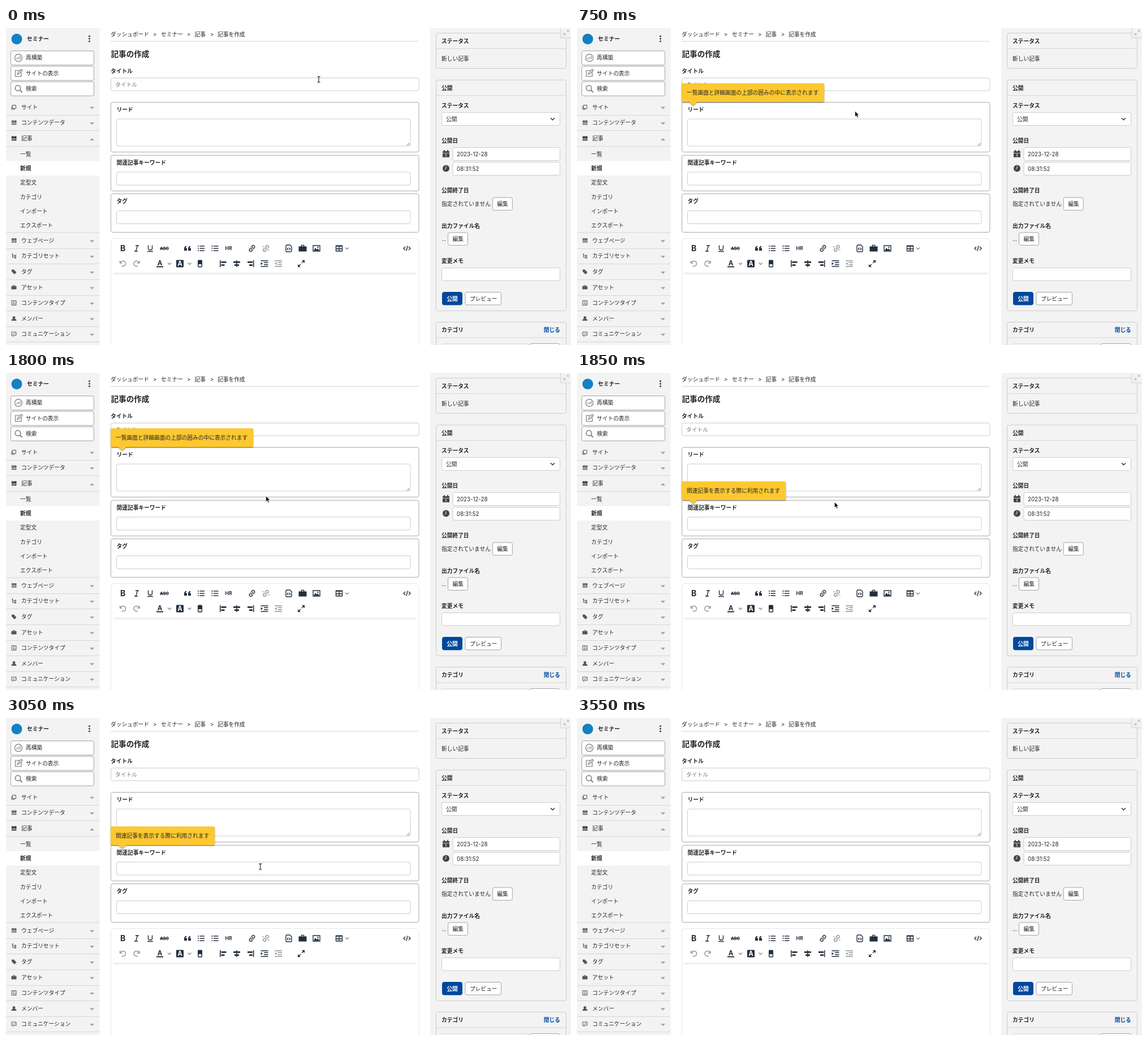
Animation of 999 by 561 pixels, one loop 3.95 s. Source, as an HTML page:

```html
<!DOCTYPE html>
<html lang="ja">
<head>
<meta charset="utf-8">
<title>記事の作成</title>
<style>
  html, body { margin: 0; width: 100%; height: 100%; overflow: hidden; background: #fff; }
  svg { display: block; }
  text { font: 9.72px Inter, "Noto Sans CJK JP", "Noto Sans CJK", sans-serif; fill: #212529; white-space: pre; }
  text.bold { font-weight: 700; }
  text.title { font-size: 13.6px; font-weight: 700; }
  text.hint { fill: #777; }
  text.link { fill: #00489c; font-weight: 700; }
  text.light { fill: #fff; font-weight: 700; }
  .white { fill: #fff; }
  .field { fill: #fff; stroke: #ccc; }
  .button { fill: #fff; stroke: #a3a3a3; }
  .group { fill: #fff; stroke: #aaa; }
  .card { fill: #f3f3f3; stroke: #ccc; }
  .primary { fill: #00489c; stroke: #00489c; }
  .editor { fill: #fff; stroke: #e6e6e6; }
  .rule { stroke: #d6d6d6; fill: none; }
  .caret { fill: #a0a0a0; }
  .icon { fill: none; stroke: #222f3e; stroke-width: 1.4; }
  .solid { fill: #222f3e; }
  .gray { stroke: #8a8a8a; }
  .pale { opacity: .5; }
  .menu-icon { fill: none; stroke: #555; }
  .menu-solid { fill: #555; }
  .open .menu-solid { fill: #222; }
  .glyph text { font-family: Inter, sans-serif; fill: #222f3e; text-anchor: middle; font-weight: 700; }
  .tip { filter: drop-shadow(0 1px 1.2px #0007); }
  .tip path { fill: #fdc830; }
</style>
</head>
<body>
<svg id="stage" width="999" height="561" viewBox="0 0 999 561"></svg>
<script>
const stage = document.getElementById('stage');

// Text is placed by its left edge and vertical centre.
const txt = (x, y, s, cls = '') =>
  `<text x="${x}" y="${y + (cls === 'title' ? 5 : 4)}" class="${cls}">${s}</text>`;
const box = (x1, y1, x2, y2, cls, r = 3) =>
  `<rect x="${x1}" y="${y1}" width="${x2 - x1}" height="${y2 - y1}" rx="${r}" class="${cls}"/>`;
const path = (d, cls) => `<path d="${d}" class="${cls}"/>`;
const at = (x, y, content, cls = '') =>
  `<g transform="translate(${x} ${y})" class="${cls}">${content}</g>`;
const hline = (x1, x2, y) => path(`M${x1} ${y}H${x2}`, 'rule');
const caret = (y, up) => path(up ? `M148 ${y + 2}h8l-4 -4z` : `M148 ${y - 2}h8l-4 4z`, 'caret');
const chevron = (x, y, s = 3, cls = 'icon') => path(`M${x - s} ${y - s / 2}l${s} ${s}l${s} ${-s}`, cls);

const gridIcon = path('M-4 -4h2.4v4.5h-2.4zM-1 -4h2.4v4.5h-2.4zM2 -4h2.4v4.5h-2.4zM-4 1.5h2.4v2.2h-2.4zM-1 1.5h2.4v2.2h-2.4zM2 1.5h2.4v2.2h-2.4z', 'menu-solid');
const caseIcon = (cls, k = 1) =>
  `<path transform="scale(${k})" fill-rule="evenodd" class="${cls}" d="M-5 -2.5h3v-2h4v2h3v6.5h-10zM-1 -2.5h2v-1h-2z"/>`;

function sidebar() {
  const rows = [
    [139.5, 'サイト', path('M-2.5 -3.5h6v6h-6zM-4 -1.5v5.5h5.5', 'menu-icon')],
    [167, 'コンテンツデータ', gridIcon],
    [195, '記事', gridIcon],
    [375.5, 'ウェブページ', gridIcon],
    [403, 'カテゴリセット', path('M-4 -3.5h3M-2.5 -3.5v6h3M-2.5 -.5h3M1 -1.5h2.5v2h-2.5zM1 1.8h2.5v2h-2.5z', 'menu-icon')],
    [431, 'タグ', path('M-4 -4h4l4.5 5l-3.5 3.5l-5 -5z', 'menu-solid')],
    [458.5, 'アセット', caseIcon('menu-solid', .9)],
    [486, 'コンテンツタイプ', path('M-4 -4h8v8h-8zM-2 -1.8h4M-2 .7h1.5v1.3h-1.5M1 .7h1.5M1 2.2h1.5', 'menu-icon')],
    [513.5, 'メンバー', path('M-4.5 4q0 -3 3 -3.5q-1 -1 -1 -2.5q.5 -2 2.5 -2t2.5 2q0 1.5 -1 2.5q3 .5 3 3.5z', 'menu-solid')],
    [541, 'コミュニケーション', path('M-4 -3.5h8v6h-4l-2 2v-2h-2zM-2 -.5l1.5 1.5l3 -3', 'menu-icon')],
  ];
  const children = ['一覧', '新規', '定型文', 'カテゴリ', 'インポート', 'エクスポート'];
  const buttons = [
    ['再構築', '<circle r="6.5"/><path d="M-3 2.5v-2.5M0 2.5v-4M3 2.5v-5.5"/>'],
    ['サイトの表示', '<path d="M2 -5h-7.5v10.5h10.5v-7M-2 2l1 -3l6 -6l2 2l-6 6z"/>'],
    ['検索', '<circle cx="-1" cy="-1" r="4.7" stroke-width="1.8"/><path stroke-width="2.2" d="M2.5 2.5l4 4"/>'],
  ];
  const menuRow = ([y, label, icon]) => {
    const open = label === '記事';
    return at(14, y + .5, icon, open ? 'open' : '') + txt(27, y, label)
      + hline(0, 165, Math.floor(y + 14.6) + .5) + caret(y + 2, open);
  };
  return '<rect width="165.5" height="561" fill="#f3f3f3"/>'
    + '<circle cx="19" cy="19.5" r="9.5" fill="#1480c4"/>' + txt(37, 19, 'セミナー', 'bold')
    + [14.5, 19, 23.5].map(y => `<circle cx="147.5" cy="${y}" r="1.6" fill="#444"/>`).join('')
    + buttons.map(([label, icon], i) => {
      const y = 40.5 + i * 27.3;
      return box(8.5, y, 155.5, y + 25, 'button') + txt(35, y + 11.8, label) + at(22, y + 12.3, icon, 'icon gray');
    }).join('')
    + box(0, 235.5, 165.5, 261, 'white', 0)
    + rows.map(menuRow).join('') + hline(0, 165, 362)
    + children.map((label, i) => txt(25, 222.7 + i * 25.35, label, i === 1 ? 'bold' : '')).join('');
}

function toolbar() {
  const letter = (s, size, extra = '') => `<text y="${size * .36}" style="font-size:${size}px" ${extra}>${s}</text>`;
  const lines = d => path(d, 'icon');
  const solid = d => path(d, 'solid');
  const list = 'M-2.5 -4h8.5M-2.5 0h8.5M-2.5 4h8.5';
  const indent = 'M-6.5 -5h13M-1 -1.7h7.5M-1 1.7h7.5M-6.5 5h13';
  const link = '<g transform="rotate(38)">' + lines('M-2.5 -.5v-3q0 -2.5 2.5 -2.5t2.5 2.5v3M-2.5 .5v3q0 2.5 2.5 2.5t2.5 -2.5v-3M0 -3v6') + '</g>';
  const undo = 'M-5 -5v4h4M-5 -1q2 -4 6 -3.5q4 .8 4 4.5t-4 4.5h-3';
  const quote = 'v-4q0 -3.5 4 -4.5v2q-1.5 .5 -1.5 2h2.5v4.5z';
  const pen = letter('A', 11.5);
  const top = [
    [206.5, letter('B', 14)],
    [231, lines('M-2 -5h6M1.5 -5l-3 10M-4 5h6')],
    [255, lines('M-3.5 -5.5v5q0 3.5 3.5 3.5t3.5 -3.5v-5M-5 5.5h10')],
    [280, letter('ABC', 7.2) + lines('M-8 0h16')],
    [321, solid(`M-6 4${quote}M1 4${quote}`)],
    [345, lines(list + 'M-6 -4h2M-6 0h2M-6 4h2')],
    [369.5, lines(list + 'M-5 -5.5v3M-6 0h2M-6 4h2')],
    [393.5, letter('HR', 8.6)],
    [435, link],
    [459.5, link + lines('M-6 -3h2M4 3h2M3 -6v1M-3 6v-1'), 'pale'],
    [500, lines('M-5 -4q0 -2 2 -2h5l3 3v7q0 2 -2 2h-6q-2 0 -2 -2zM-1 -1l-1.5 2l1.5 2M1 -1l1.5 2l-1.5 2')],
    [524.5, caseIcon('solid', 1.4)],
    [549, lines('M-6 -5h12v10h-12z') + solid('M-5 4l3 -5l2.5 3l2 -2l2.5 4z') + '<circle cx="2.5" cy="-2" r="1.2" class="solid"/>'],
    [589, lines('M-5.5 -4.8h11v9.6h-11zM-5.5 -4h11M-5.5 .8h11M0 -4v9')],
    [709, lines('M-3 -3l-3 3l3 3M3 -3l3 3l-3 3M1 -4.5l-2 9')],
  ];
  const bottom = [
    [206.5, lines(undo), 'pale'],
    [231, `<g transform="scale(-1 1)">${lines(undo)}</g>`, 'pale'],
    [272, at(0, -1.5, pen) + solid('M-6 4.5h12v2h-12z')],
    [307.5, box(-6.5, -6.5, 6.5, 6.5, 'solid', 1) + pen.replace('style="', 'style="fill:#fff;')],
    [343, box(-4, -6.5, 4, 6.5, 'solid', 1.5) + box(-2.5, 1, 2.5, 5, 'white', 0)],
    [384, solid('M-6 -6h1.6v12h-1.6zM-3.5 -4h9v2.8h-9zM-3.5 1.2h6v2.8h-6z')],
    [408, solid('M-.8 -6h1.6v12h-1.6zM-6 -4h12v2.8h-12zM-4 1.2h8v2.8h-8z')],
    [432.5, solid('M4.4 -6h1.6v12h-1.6zM-5.5 -4h9v2.8h-9zM-2.5 1.2h6v2.8h-6z')],
    [457, lines(indent) + solid('M-6.5 -2.5l3.5 2.5l-3.5 2.5z')],
    [481.5, lines(indent) + solid('M-3 -2.5l-3.5 2.5l3.5 2.5z'), 'pale'],
    [522, lines('M-4 4l3 -3M1 -1l3 -3') + solid('M1 -6h5v5zM-6 1v5h5z')],
  ];
  const row = (items, y) => items.map(([x, icon, cls = '']) => at(x, y, icon, 'glyph ' + cls)).join('');
  return row(top, 390) + row(bottom, 417)
    + [[603, 390], [289, 417], [324.5, 417]].map(([x, y]) => chevron(x, y, 3, 'icon gray')).join('');
}

function form() {
  const crumbs = [[185, 'ダッシュボード'], [260, '&gt;'], [274, 'セミナー'], [320, '&gt;'],
    [333.5, '記事'], [361, '&gt;'], [374, '記事を作成']];
  const groups = [[131.5, 219.5, 'リード', 161, 209], [225.3, 288.3, '関連記事キーワード', 255, 278],
    [293.5, 361.5, 'タグ', 323.5, 346.5]];
  return crumbs.map(([x, s]) => txt(x, 10.5, s)).join('') + hline(185, 730, 23.5)
    + txt(185.5, 45.5, '記事の作成', 'title') + txt(185, 76, 'タイトル', 'bold')
    + box(185.5, 88.5, 730, 111, 'field') + txt(193, 99.5, 'タイトル', 'hint')
    + groups.map(([y1, y2, label, in1, in2]) => box(185.5, y1, 730, y2, 'group')
      + txt(195.5, y1 + 12.2, label, 'bold') + box(195.5, in1, 715, in2, 'field')).join('')
    + '<path d="M708.5 208l5 -5M711.5 208l2 -2" stroke="#777"/>'
    + box(185.5, 372.5, 730, 600, 'editor', 7)
    + '<path d="M190 434h536" stroke="#ddd"/><path d="M190 435.5h536" stroke="#f2f2f2" stroke-width="2"/>'
    + toolbar();
}

function panel() {
  const card = (y1, y2, title) => box(760.5, y1, 990.5, y2, 'card') + hline(760, 990, y1 + 27.5)
    + txt(770, y1 + 13.7, title, 'bold');
  const labels = [[137, 'ステータス'], [199, '公開日'], [287, '公開終了日'], [349.5, '出力ファイル名'], [411.5, '変更メモ']];
  const edit = (x, y) => box(x, y, x + 35, y + 22.5, 'button') + txt(x + 8, y + 11.2, '編集');
  return '<rect x="750" width="249" height="561" fill="#f3f3f3"/>'
    + card(9, 71.5, 'ステータス') + txt(770, 54, '新しい記事')
    + card(92, 500.5, '公開') + labels.map(([y, s]) => txt(770, y, s, 'bold')).join('')
    + box(770.5, 149.5, 979.5, 172.5, 'field') + txt(778, 161, '公開') + chevron(966.5, 161, 3.5)
    + box(790, 211.5, 979.5, 234.5, 'field') + txt(797, 223, '2023-12-28')
    + box(790, 237.5, 979.5, 260.5, 'field') + txt(797, 249, '08:31:52')
    + at(778, 222.5, '<path d="M-6 -4.5h2v-2h2v2h4v-2h2v2h2v3h-12zM-6 -.8h12v7h-12z" fill="#444"/>'
      + '<path d="M-1 1.5l1 -.5v4" stroke="#fff" fill="none"/>')
    + at(778, 248.5, '<circle r="6" fill="#444"/><path d="M0 -4v4l-2.5 2" stroke="#fff" fill="none"/>')
    + txt(770, 310.5, '指定されていません') + edit(860.3, 300)
    + txt(770, 373, '...') + edit(781.5, 362)
    + box(770.5, 424.5, 979.5, 447, 'field')
    + box(771.5, 467.5, 806.5, 490, 'primary') + txt(779.3, 478.5, '公開', 'light')
    + box(812, 467.5, 875.5, 490, 'button') + txt(820, 478.5, 'プレビュー')
    + card(520.5, 600, 'カテゴリ') + txt(950.7, 534.3, '閉じる', 'link')
    + box(770.5, 559, 925, 590, 'field') + box(926, 558.5, 979.5, 590, 'button')
    + '<path d="M980.5 0v17.5h19" fill="#f0f0f0" stroke="#d4d4d4"/>'
    + at(990.5, 8, '<path d="M-4 4l3 -3M1 -1l3 -3M-4 1v3h3M1 -4h3v3" fill="none" stroke="#aaa"/>');
}

const tip = (id, y, width, s) => `<g id="${id}">` + at(185, y, path(
  `M2 0H${width - 2}q2 0 2 2v29q0 2 -2 2H27l-6.5 6.5L14 33H2q-2 0 -2 -2V2q0 -2 2 -2z`, '') + txt(9, 16.2, s), 'tip') + '</g>';

const beamShape = 'M-2.7 -5.2q2.7 0 2.7 1.5v7.4q0 1.5 -2.7 1.5M2.7 -5.2q-2.7 0 -2.7 1.5v7.4q0 1.5 2.7 1.5';
stage.innerHTML = sidebar() + form() + panel()
  + tip('leadTip', 98, 252, '一覧画面と詳細画面の上部の囲みの中に表示されます')
  + tip('keywordTip', 192, 184, '関連記事を表示する際に利用されます')
  + '<path id="arrow" d="M0 0v10l2.3 -2l1.7 3.8l1.8 -.8l-1.7 -3.6h3.1z" fill="#000" stroke="#fff" stroke-width=".7"/>'
  + `<g id="beam" fill="none"><path d="${beamShape}" stroke="#fff" stroke-width="2"/>`
  + `<path d="${beamShape}" stroke="#111" stroke-width="1.1"/></g>`;

const [arrow, beam, leadTip, keywordTip] =
  ['arrow', 'beam', 'leadTip', 'keywordTip'].map(id => document.getElementById(id));

const LOOP = 3950, STEP = 50;
const clamp = v => Math.min(1, Math.max(0, v));
const smooth = p => p * p * (3 - 2 * p);
const linear = p => p;
const moves = [
  { start: 400, time: 550, ease: smooth, from: [553, 91], bend: [490, 116], to: [481.5, 184] },
  { start: 1550, time: 550, ease: smooth, from: [481.5, 184], bend: [449, 223], to: [449.7, 262] },
  { start: 3050, time: 500, ease: linear, from: [449.7, 263], bend: [441, 418], to: [434, 573] },
];
const inputs = [[88, 111], [161, 209], [255, 278], [323, 347], [434, 700]];

function cursorAt(t) {
  const { start, time, ease, from, bend, to } = moves.filter(m => t >= m.start).pop() || moves[0];
  const s = ease(clamp((t - start) / time));
  return from.map((a, i) => (1 - s) ** 2 * a + 2 * s * (1 - s) * bend[i] + s * s * to[i]);
}
const show = (el, visible) => el.setAttribute('visibility', visible ? 'visible' : 'hidden');

function draw() {
  const t = Math.floor(performance.now() % LOOP / STEP) * STEP;
  const [x, y] = cursorAt(t);
  const typing = inputs.some(([top, bottom]) => y >= top && y <= bottom);
  for (const shape of [arrow, beam]) {
    shape.setAttribute('transform', `translate(${x} ${y})`);
    show(shape, (shape === beam) === typing);
  }
  show(leadTip, t >= 750 && t < 1850);
  show(keywordTip, t >= 1850 && t < 3100);
  requestAnimationFrame(draw);
}
draw();
</script>
</body>
</html>
```
